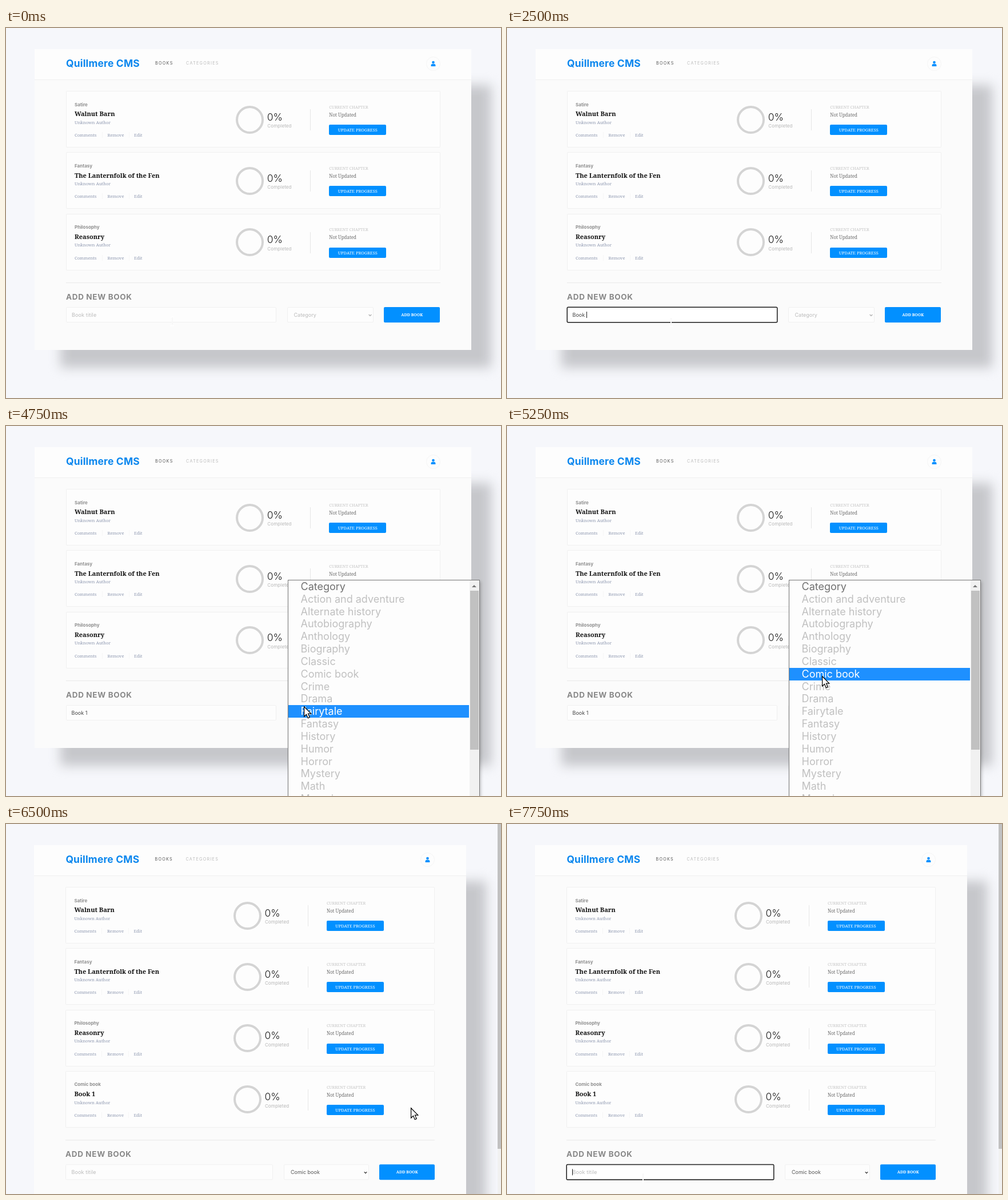
Animation of 866x647 px, one loop 8 s. Source, as an HTML page:

```html
<!DOCTYPE html>
<html lang="en">
<head>
<meta charset="utf-8">
<title>Book list</title>
<style>
:root { --blue: #0290ff; --sans: Inter, "Open Sans", sans-serif; --slab: "Noto Serif", serif; }
* { box-sizing: border-box; }
html, body { margin: 0; width: 100%; height: 100%; overflow: hidden; }
#stage { position: relative; isolation: isolate; width: 866px; height: 647px; overflow: hidden; background: #f6f7fb; font-family: var(--sans); }
#stage div, #stage p, #stage i, #stage svg { position: absolute; }
p { margin: 0; line-height: 20px; white-space: pre; }

/* Every animated part shares one clock and jumps between states. */
.anim, #typed::before, #typed::after { animation: 8s step-end infinite; }

#panel { left: 50px; top: 37px; width: 764px; height: 526px; background: #fbfbfb; animation-name: panel; }
#panel::before { content: ""; position: absolute; z-index: -1; inset: 63px -35px -31px 45px; background: #c6c7cb; filter: blur(10px); }
#head { left: 0; right: 0; top: 0; height: 54px; background: #fdfdfd; border-bottom: 1px solid #f0f0f0; }
#wrap { left: 55px; top: -37px; width: 654.5px; height: 700px; animation-name: wrap; }
.brand { top: 52px; font-size: 17.4px; font-weight: 700; letter-spacing: .2px; color: #0b87ee; }
.nav { top: 52px; font-size: 7.2px; letter-spacing: 1.3px; color: #555; }
.user { right: 0; top: 50px; width: 25px; height: 25px; border: 1px solid #f5f5f5; border-radius: 50%; }

.card { left: 0; width: 100%; height: 99px; background: #fdfdfd; border-radius: 2px; box-shadow: inset 0 0 0 1px #f0f0f0; }
.genre { left: 15px; top: 13.5px; font-size: 8px; font-weight: 700; color: #8f8f8f; }
.title { left: 15px; top: 30.3px; font: 700 11px/20px var(--slab); color: #121212; }
.soft { top: 67px; font: 7.6px/20px var(--slab); color: #8e98b0; }
.sep { top: 72px; width: 1px; height: 10px; background: #f6f6f6; }
.mid { left: calc(45% + 2.8px); top: 0; }
.ring { left: 0; top: 25.5px; width: 49px; height: 49px; border: 4px solid #d4d4d4; border-radius: 50%; }
.pct { left: 54.5px; top: 35.5px; font-size: 17.5px; font-weight: 300; color: #1c1c1c; }
.done { left: 55px; top: 51px; font-size: 8px; letter-spacing: .12px; color: #b6b6b6; }
.bar { left: 130px; top: 32px; width: 1px; height: 37px; background: #e6e6e6; }
.chap { left: 163px; top: 17.8px; font: 300 7.2px/20px var(--slab); color: #c6c6c6; }
.now { left: 163px; top: 31.8px; font: 300 8px/20px var(--slab); color: #6c6c6c; }
.btn { background: var(--blue); border-radius: 2px; color: #fff; text-align: center; }
.card .btn { left: 163px; top: 59px; width: 100px; height: 18px; font: 7.5px/19px var(--slab); }
#extra { visibility: hidden; animation-name: extra; }

#form { left: 0; top: 445px; width: 100%; height: 80px; animation-name: form; }
.rule { left: 0; top: 0; width: 100%; height: 1px; background: #e9e9e9; }
.add { top: 15.2px; font-size: 13.5px; font-weight: 700; letter-spacing: .65px; color: #888; }
.field { top: 43px; height: 27px; background: #fdfdfd; border: 1px solid #f0f0f0; border-radius: 2px; font-size: 9px; }
.field p { top: 0; left: 9px; line-height: 26px; color: #bbb; }
#book { left: 0; width: 56.2%; animation-name: book; }
#hint { letter-spacing: .13px; animation-name: hint; }
#book #typed { left: 8.5px; color: #444; }
#typed::before { content: ""; animation-name: type; }
#typed::after { content: ""; display: inline-block; width: 1.3px; height: 11px; vertical-align: -2px; background: #222; opacity: 0; animation-name: caret; }
#pick { left: 59.06%; width: 23.15%; color: #aaa; animation-name: pick; }
#pick p { left: 11px; }
#cat { animation-name: cat; }
#chosen { visibility: hidden; animation-name: chosen; }
#pick #chosen { color: #555; }
#pick svg { right: 2px; top: 11px; }
#form .btn { left: 85%; top: 43px; width: 14.95%; height: 27px; font: 700 6.9px/28px var(--slab); }

#scroll { left: 860px; top: 0; width: 6px; height: 647px; background: #f1f1f1; visibility: hidden; animation-name: extra; }
#scroll i { width: 6px; height: 568px; background: #c1c1c1; }

#menu { left: 492.5px; top: 269px; width: 336px; height: 400px; background: #fdfdfd; border: 1px solid #777; box-shadow: 2px 3px 5px #0003; visibility: hidden; animation-name: menu; }
#menu p { left: 0; width: 316px; height: 21.83px; padding-left: 22px; font-size: 18px; line-height: 21.83px; color: #c0c0c0; }
#menu p:first-child { color: #707070; }
#comic { animation-name: comic; }
#fairy { animation-name: fairy; }
.track { right: 0; top: 0; width: 17px; height: 400px; background: #f1f1f1; }
.thumb { left: 1px; top: 18px; width: 15px; height: 278px; background: #c1c1c1; }
.up { left: 4.5px; top: 8px; border: 4px solid transparent; border-top: 0; border-bottom: 4px solid #777; }

.ptr { left: 0; top: 0; overflow: visible; transform: translate(-99px, 0); }
#beam { animation-name: beam; }
#arrow { animation-name: arrow; }
#hand { animation-name: hand; }

@keyframes panel { 81.25%, 100% { left: 49.4px; width: 755.6px; height: 633.5px; } }
@keyframes wrap { 81.25%, 100% { width: 646px; } }
@keyframes extra { 81.25%, 100% { visibility: visible; } }
@keyframes form { 81.25%, 100% { transform: translateY(107.3px); } }
@keyframes book {
  6.25%, 96.875%, 100% { border-color: #1a1a1a; background: #fff; box-shadow: 0 0 0 .5px #1a1a1a; }
  59.375% { border-color: #f0f0f0; background: #fdfdfd; box-shadow: none; }
}
@keyframes hint { 18.75% { visibility: hidden; } 81.25% { visibility: visible; } }
@keyframes type {
  18.75% { content: "B"; } 21.875% { content: "Bo"; } 25% { content: "Book"; }
  31.25% { content: "Book "; } 34.375% { content: "Book 1"; } 81.25% { content: ""; }
}
@keyframes caret {
  6.25%, 18.75%, 46.875%, 96.875%, 100% { opacity: 1; }
  12.5%, 40.625%, 53.125% { opacity: 0; }
}
@keyframes pick {
  71.875% { color: #222; border-color: #1a1a1a; background: #fff; box-shadow: 0 0 0 .5px #1a1a1a; }
  81.25%, 100% { color: #222; border-color: #f0f0f0; background: #fdfdfd; box-shadow: none; }
}
@keyframes cat { 71.875%, 100% { visibility: hidden; } }
@keyframes chosen { 71.875%, 100% { visibility: visible; } }
@keyframes menu { 59.375% { visibility: visible; } 71.875% { visibility: hidden; } }
@keyframes fairy { 59.375% { background: #1e90ff; color: #fff; } 65.625% { background: none; color: #c0c0c0; } }
@keyframes comic { 65.625%, 100% { background: #1e90ff; color: #fff; } }
@keyframes beam {
  0% { transform: translate(291px, 513px); } 3.125% { transform: translate(287px, 514px); }
  50% { transform: translate(418px, 515px); } 53.125% { transform: translate(-99px, 0); }
  93.75%, 100% { transform: translate(238px, 618px); }
}
@keyframes arrow {
  53.125% { transform: translate(519px, 477px); } 56.25% { transform: translate(521px, 490px); }
  65.625% { transform: translate(551px, 437px); } 75% { transform: translate(-99px, 0); }
  81.25% { transform: translate(708px, 496px); } 84.375% { transform: translate(325px, 522px); }
  87.5% { transform: translate(283px, 545px); } 90.625% { transform: translate(229px, 573px); }
  93.75% { transform: translate(-99px, 0); }
}
@keyframes hand {
  75% { transform: translate(711px, 509px); } 78.125% { transform: translate(709px, 497px); }
  81.25% { transform: translate(-99px, 0); }
}
</style>
</head>
<body>
<div id="stage">
  <div id="panel" class="anim">
    <div id="head"></div>
    <div id="wrap" class="anim">
      <p class="brand">Quillmere CMS</p>
      <p class="nav" style="left:156px">BOOKS</p>
      <p class="nav" style="left:210px;color:#bbb">CATEGORIES</p>
      <div class="user">
        <svg width="23" height="23" fill="#0290ff"><circle cx="11.5" cy="9" r="2.3"/><path d="M7.6 16v-1.6q0-2.6 2.6-2.6h2.6q2.6 0 2.6 2.6V16z"/></svg>
      </div>
      <div id="list"></div>
      <div id="form" class="anim">
        <div class="rule"></div>
        <p class="add">ADD NEW BOOK</p>
        <div id="book" class="field anim"><p id="hint" class="anim">Book titile</p><p id="typed"></p></div>
        <div id="pick" class="field anim">
          <p id="cat" class="anim">Category</p><p id="chosen" class="anim">Comic book</p>
          <svg width="6" height="5" fill="none" stroke="currentColor" stroke-width="1.2"><path d="M.7 1 3 3.3 5.3 1"/></svg>
        </div>
        <div class="btn">ADD BOOK</div>
      </div>
    </div>
  </div>
  <div id="scroll" class="anim"><i></i></div>
  <div id="menu" class="anim"></div>
  <svg id="beam" class="ptr anim" width="1" height="1" fill="none">
    <path d="M-3-7.5h2.2L0-6.8.8-7.5H3M0-6.8V6.8M-3 7.5h2.2L0 6.8l.8.7H3" stroke="#fff" stroke-width="2"/>
    <path d="M0-6.5v13" stroke="#e4e4e4" stroke-width=".8" stroke-dasharray="2 1"/>
  </svg>
  <svg id="arrow" class="ptr anim" width="1" height="1">
    <path d="M.6.8v17.2l3.9-3.7 2.8 6.4 3-1.3-2.8-6.2h5.3z" fill="#fff" stroke="#000" stroke-width="1.2"/>
  </svg>
  <svg id="hand" class="ptr anim" width="1" height="1" stroke="#000" stroke-width="1.2" stroke-linejoin="round">
    <path d="M5 2.2q0-1.7 1.7-1.7t1.7 1.7V9q.2-1 1.7-1t1.7 1.4q.2-.9 1.6-.9T15 10q.3-.8 1.6-.8t1.6 1.7V16c0 3.2-1.7 4.2-1.9 6.4v2.8H8v-2.4C5.2 19.4 3 16.4 1 13.8c-1-1.5 1-2.8 2.3-1.5L5 14z" fill="#fff"/>
    <path d="M8.4 9v4.5M11.8 9.4v4.1M15 10v3.5" fill="none"/>
  </svg>
</div>
<script>
const books = [
  ["Satire", "Walnut Barn"],
  ["Fantasy", "The Lanternfolk of the Fen"],
  ["Philosophy", "Reasonry"],
  ["Comic book", "Book 1"]
];
const genres = ["Category", "Action and adventure", "Alternate history", "Autobiography", "Anthology",
  "Biography", "Classic", "Comic book", "Crime", "Drama", "Fairytale", "Fantasy", "History", "Humor",
  "Horror", "Mystery", "Math", "Memoir"];
const ids = { "Comic book": "comic", Fairytale: "fairy" };

const card = ([genre, title], i) => `
  <div class="card anim" ${i === 3 ? 'id="extra"' : ""} style="top:${110 + i * 107.3}px">
    <p class="genre">${genre}</p>
    <p class="title">${title}</p>
    <p class="soft" style="left:15px;top:44.8px">Unknown Author</p>
    <p class="soft" style="left:15px">Comments</p><i class="sep" style="left:63px"></i>
    <p class="soft" style="left:72.5px">Remove</p><i class="sep" style="left:110px"></i>
    <p class="soft" style="left:119px">Edit</p>
    <div class="mid">
      <div class="ring"></div>
      <p class="pct">0%</p><p class="done">Completed</p>
      <i class="bar"></i>
      <p class="chap">CURRENT CHAPTER</p><p class="now">Not Updated</p>
      <div class="btn">UPDATE PROGRESS</div>
    </div>
  </div>`;
const option = (name, i) =>
  `<p class="anim" ${ids[name] ? `id="${ids[name]}"` : ""} style="top:${i * 21.83}px">${name}</p>`;

const list = document.getElementById("list");
list.style.width = "100%";
list.innerHTML = books.map(card).join("");
document.getElementById("menu").innerHTML = genres.map(option).join("") +
  '<div class="track"><i class="up"></i><i class="thumb"></i></div>';
</script>
</body>
</html>
```
